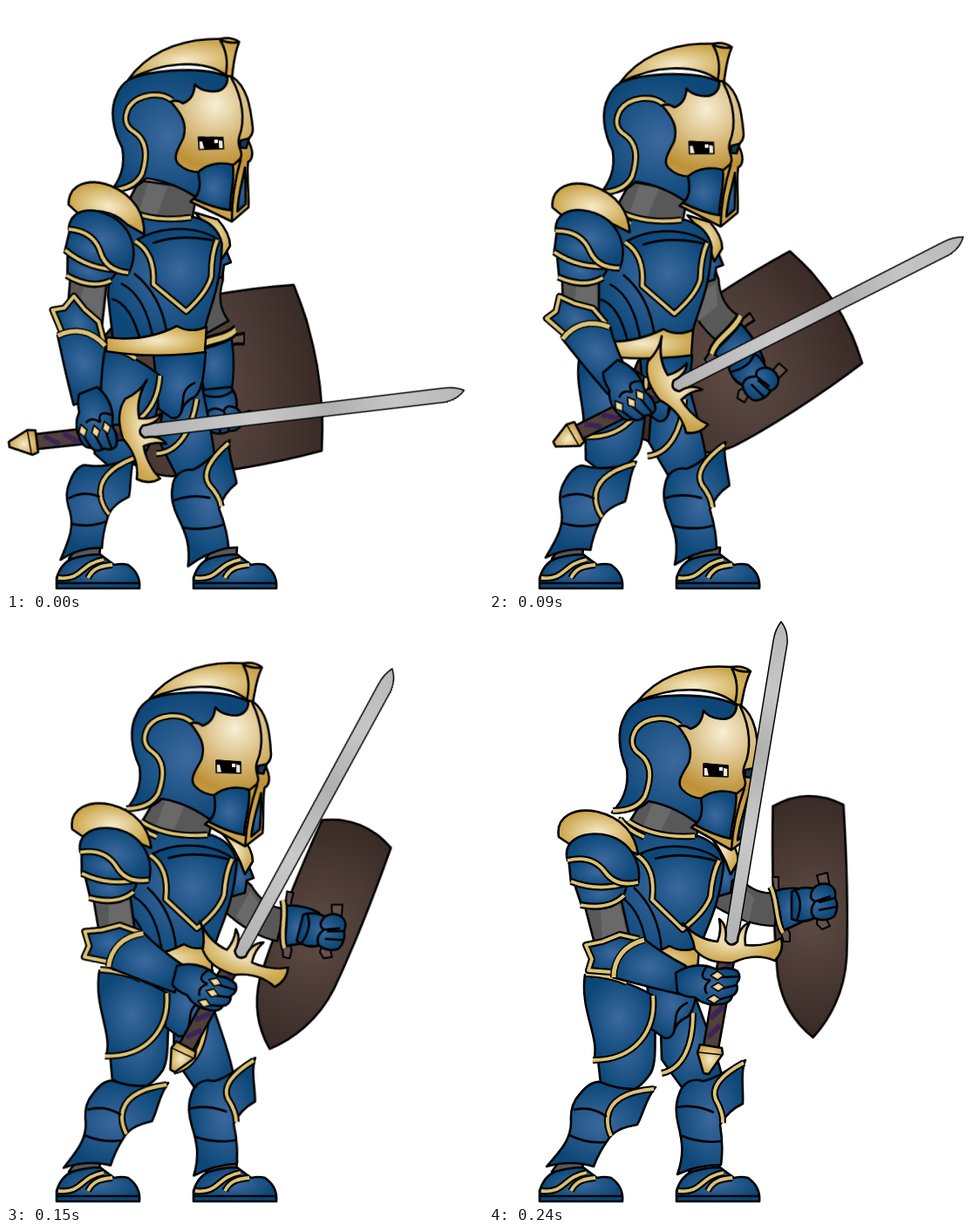
An HTML page that plays this animation: 547x671 px, repeating every 0.39 s.

```html
<!DOCTYPE html>
<html lang="en">
<head>
<meta charset="utf-8">
<title>Knight raising his guard</title>
<style>
html, body { margin: 0; width: 100%; height: 100%; overflow: hidden; background: #fff; }
svg { display: block; width: 547px; height: 671px; }
path { stroke: #000; stroke-width: 2.6; stroke-linejoin: round; }
.blue { fill: url(#blue); }
.gold { fill: url(#gold); }
.gray { fill: #585858; }
.brown { fill: #65524b; stroke-width: 2; }
.line { fill: none; }
.edge { fill: none; stroke-width: 8; }
.trim { fill: none; stroke: #dcc275; stroke-width: 3.8; }
.flat { stroke: none; }
.sheen { stroke: none; fill: #696969; }

/* Poses --a to --f; steps() gives the 30 ms frame rate. */
.part { animation: guard 390ms infinite; }
@keyframes guard {
  0% { transform: var(--a); animation-timing-function: steps(2); }
  15.38% { transform: var(--b); animation-timing-function: steps(2); }
  30.76% { transform: var(--c); animation-timing-function: step-end; }
  38.46% { transform: var(--d); animation-timing-function: step-end; }
  46.15% { transform: var(--e); animation-timing-function: steps(2); }
  61.53%, 100% { transform: var(--f, translate(0px, 0px) rotate(0deg)); animation-timing-function: step-end; }
}
#shield {
  transform-origin: 0 0;
  --a: translate(346px, 415px) rotate(80.4deg) scale(1.93, 1);
  --b: translate(367.5px, 387.5px) rotate(71.2deg) scale(1.76, 1);
  --c: translate(405.5px, 303.5px) rotate(43.1deg) scale(1.3, 1);
  --d: translate(402px, 246.5px) rotate(22deg) scale(.85, 1);
  --e: translate(372px, 219px) rotate(3.2deg) scale(.86, 1);
  --f: translate(366px, 214px) rotate(-1.2deg) scale(.81, 1);
}
#farUpper {
  transform-origin: 272px 300px;
  --a: translate(-34px, 5px) rotate(59deg);
  --b: translate(-29px, 8px) rotate(53deg);
  --c: translate(-15px, 8px) rotate(25deg);
  --d: translate(-5px, 7px) rotate(12deg);
  --e: translate(-1px, 4px) rotate(1deg);
}
#farShoulder {
  transform-origin: 268px 275px;
  --a: translate(-29px, -3px) rotate(0deg);
  --b: translate(-24px, 0px) rotate(0deg);
  --c: translate(-13px, 0px) rotate(0deg);
  --d: translate(-3px, 0px) rotate(0deg);
  --e: translate(-1px, 0px) rotate(0deg);
}
#farForearm {
  transform-origin: 328px 335px;
  --a: translate(-90px, 45px) rotate(91deg) scale(1.75, .9);
  --b: translate(-76px, 45px) rotate(80deg) scale(1.6, .95);
  --c: translate(-42px, 36px) rotate(37deg) scale(1.26, 1);
  --d: translate(-12px, 16px) rotate(14deg) scale(1.07, 1);
  --e: translate(-3px, 0px) rotate(5deg) scale(1.05, 1);
  --f: translate(0px, 0px) rotate(0deg) scale(1, 1);
}
#farHand {
  transform-origin: 377px 325px;
  --a: translate(-128px, 143px) rotate(84deg);
  --b: translate(-107px, 130px) rotate(74deg);
  --c: translate(-32px, 76px) rotate(37deg);
  --d: translate(-10px, 33px) rotate(14deg);
  --e: translate(-1px, 7px) rotate(3deg);
}
#farShin {
  transform-origin: 243px 632px;
  --a: translate(-9px, 0px) rotate(-12.5deg);
  --b: translate(-6px, 0px) rotate(-10.5deg);
  --c: translate(-2px, 0px) rotate(-6deg);
  --d: translate(-1px, 0px) rotate(-3.2deg);
  --e: translate(0px, 0px) rotate(-1.3deg);
}
#nearShin {
  transform-origin: 95px 628px;
  --a: translate(-7px, 0px) rotate(-16deg) scale(.92, 1);
  --b: translate(-4px, 0px) rotate(-13deg) scale(.96, 1);
  --c: translate(-1px, 0px) rotate(-6.5deg) scale(.98, 1);
  --d: translate(0px, 0px) rotate(-3deg) scale(1, 1);
  --e: translate(0px, 0px) rotate(-1deg) scale(1, 1);
  --f: translate(0px, 0px) rotate(0deg) scale(1, 1);
}
.thigh {
  transform-origin: 180px 410px;
  --a: translate(-8px, -9px) rotate(9deg);
  --b: translate(-6px, -8px) rotate(7.5deg);
  --c: translate(-5px, -4px) rotate(3.5deg);
  --d: translate(-3px, -3px) rotate(1.5deg);
  --e: translate(-1px, -1px) rotate(.5deg);
}
.hips {
  transform-origin: 190px 405px;
  --a: translate(-11px, -8px) rotate(0deg);
  --b: translate(-9px, -6px) rotate(0deg);
  --c: translate(-5px, -3px) rotate(0deg);
  --d: translate(-3px, -2px) rotate(0deg);
  --e: translate(-1px, -1px) rotate(0deg);
}
#torso {
  transform-origin: 215px 310px;
  --a: translate(-19px, -5px) rotate(-4.5deg);
  --b: translate(-16px, -3px) rotate(-4deg);
  --c: translate(-8px, -2px) rotate(-2.2deg);
  --d: translate(-4px, -1px) rotate(-1deg);
  --e: translate(-1px, 0px) rotate(-.2deg);
}
#head {
  transform-origin: 225px 164px;
  --a: translate(-25.5px, -14px) rotate(-3.8deg);
  --b: translate(-22px, -12px) rotate(-3.3deg);
  --c: translate(-11.5px, -7px) rotate(-1.8deg);
  --d: translate(-5px, -3.5px) rotate(-.8deg);
  --e: translate(-1.3px, -.7px) rotate(-.2deg);
}
#pauldron {
  transform-origin: 125px 245px;
  --a: translate(-8px, -15px) rotate(9deg);
  --b: translate(-8px, -15px) rotate(8deg);
  --c: translate(-6px, -14px) rotate(3deg);
  --d: translate(-4px, -8px) rotate(1deg);
  --e: translate(-1px, -1px) rotate(.3deg);
}
#upperArm {
  transform-origin: 130px 276px;
  --a: translate(-20px, -8px) rotate(19deg);
  --b: translate(-18px, -9px) rotate(17deg);
  --c: translate(-11px, -11px) rotate(9deg);
  --d: translate(-5px, -6px) rotate(5deg);
  --e: translate(-1.5px, -1px) rotate(2deg);
}
#forearm {
  transform-origin: 158px 390px;
  --a: translate(-73px, -8px) rotate(63deg);
  --b: translate(-62px, -14px) rotate(56deg);
  --c: translate(-36px, -18px) rotate(17deg);
  --d: translate(-23px, -10px) rotate(7deg);
  --e: translate(-7px, -4px) rotate(2.5deg);
}
#sword {
  transform-origin: 263px 422px;
  --a: translate(-160px, 66.5px) rotate(73.8deg);
  --b: translate(-137px, 54px) rotate(66.2deg);
  --c: translate(-62px, 12px) rotate(41.2deg);
  --d: translate(-26px, 7px) rotate(19.2deg);
  --e: translate(-6px, 1px) rotate(4.6deg);
}
</style>
</head>
<body>
<svg viewBox="0 0 547 671">
  <defs>
    <radialGradient id="blue"><stop stop-color="#3c699e"/><stop offset="1" stop-color="#0d4778"/></radialGradient>
    <radialGradient id="gold"><stop stop-color="#f6ebca"/><stop offset="1" stop-color="#cba54b"/></radialGradient>
    <radialGradient id="mask" gradientUnits="userSpaceOnUse" cx="268" cy="130" r="88">
      <stop stop-color="#f8efd6"/><stop offset=".8" stop-color="#bd9136"/><stop offset="1" stop-color="#c9a24a"/>
    </radialGradient>
    <radialGradient id="wood" gradientUnits="userSpaceOnUse" cx="0" cy="125" r="150">
      <stop stop-color="#5f4c45"/><stop offset="1" stop-color="#352723"/>
    </radialGradient>
    <linearGradient id="steel" gradientUnits="userSpaceOnUse" x1="330" y1="10" x2="277" y2="370">
      <stop stop-color="#b9b9b9"/><stop offset=".2" stop-color="#c6c6c6"/><stop offset=".4" stop-color="#b0b0b0"/>
      <stop offset=".65" stop-color="#c9c9c9"/><stop offset="1" stop-color="#b2b2b2"/>
    </linearGradient>
    <path id="stud" class="gold" d="M-8 0L0-5 7 0 0 5Z" style="stroke-width:1.5"/>
    <g id="foot">
      <path class="gray" d="M72 634L80 623 108 621 107 634Z"/>
      <path class="blue" d="M58 668V656C62 643 68 637 76 634Q92 629 108 629L124 641Q133 639 140 641C150 648 154 658 153 668Z"/>
      <path class="trim" d="M60 656C88 659 84 640 112 635"/>
      <path class="trim" d="M94 656C100 644 110 642 122 641"/>
      <path class="line" d="M58 662H153"/>
    </g>
  </defs>

  <g class="part" id="shield">
    <path fill="url(#wood)" vector-effect="non-scaling-stroke" d="M-50 0Q0-22 50 0C53 60 53 130 50 175C46 215 24 246 0 266C-24 250-42 228-48 195C-53 140-53 60-50 0Z"/>
  </g>

  <g class="part" id="farUpper">
    <path class="gray" d="M258 280L286 296Q305 317 329 314L328 352Q296 352 260 330Z"/>
    <path class="sheen" d="M286 302L304 320 298 348 276 334Z"/>
  </g>
  <g class="part" id="farForearm">
    <path class="brown" d="M325 296H332V306L340 352 345 360V370H338L330 345Z"/>
    <path class="blue" d="M328 312Q346 306 364 311L364 345Q350 352 336 358Q334 332 328 312Z"/>
    <path class="trim" d="M323 307C331 322 328 345 337 360"/>
  </g>
  <g class="part" id="farHand">
    <path class="brown" d="M376 294L388 291 390 303 387 345 391 352 382 356 376 350 379 305Z"/>
    <path class="blue" d="M347 313Q358 306 372 309Q380 301 391 305Q399 310 397 320Q402 330 396 341Q386 348 373 343Q360 350 347 344Z"/>
    <path class="line" d="M372 309Q365 320 374 324L392 318M397 320L378 325M374 324Q366 335 373 343M378 334L399 330M352 312Q361 326 353 345"/>
  </g>

  <use href="#foot" x="157"/>
  <use href="#foot"/>

  <g class="part thigh">
    <path class="blue" d="M196 430L236 432C250 470 262 500 268 528L226 544Q212 525 198 505Z"/>
    <path class="trim" d="M234 452C234 490 222 516 198 521"/>
  </g>
  <g class="part" id="farShin">
    <path class="blue" d="M218 545C222 532 232 526 245 530C260 528 275 515 294 506C288 520 292 540 291 556Q274 564 265 580Q269 605 266 626Q240 626 216 637C224 615 222 600 217 580Q212 560 218 545Z"/>
    <path class="trim" d="M292 509C268 522 254 536 260 551Q269 567 268 578"/>
    <path class="line" d="M216 560Q236 556 258 566M219 592Q242 602 266 599"/>
  </g>
  <g class="part thigh">
    <path class="blue" d="M118 430H195C186 470 195 500 186 520Q172 542 150 546L128 532Q124 500 118 430Z"/>
  </g>
  <g class="part" id="nearShin">
    <path class="blue" d="M104 545C112 535 122 528 130 532Q155 543 191 537C180 550 178 565 170 580Q144 584 136 598Q126 612 120 628Q94 620 66 628C84 608 95 595 94 575Q93 557 104 545Z"/>
    <path class="trim" d="M189 539C155 542 138 553 136 572Q135 582 140 593"/>
    <path class="line" d="M97 563Q118 558 135 571M92 592Q112 602 134 600"/>
  </g>

  <g class="part hips">
    <path class="blue" d="M180 405H240C238 432 236 448 228 456Q214 462 212 474Q208 483 200 480L186 470Z"/>
    <path class="line" d="M228 440Q214 446 214 460L212 474"/>
  </g>
  <g class="part thigh">
    <path class="blue" d="M110 408Q155 412 188 432C191 472 170 505 120 507C128 480 104 450 110 408Z"/>
    <path class="trim" d="M188 432C192 472 168 506 119 506"/>
    <path class="trim" d="M111 407Q140 408 158 417"/>
  </g>

  <g class="part" id="farShoulder">
    <path class="blue" d="M256 270L281 282 287 297 279 300 277 314 256 320Z"/>
    <path class="gold" d="M246 240L272 248Q286 264 286 278L277 293Q268 264 246 240Z"/>
  </g>
  <g class="part" id="torso">
    <path class="gray" d="M180 202L246 216 238 248H195L161 233Z"/>
    <path class="sheen" d="M190 206L212 212 196 246 176 240Z"/>
    <path class="blue" d="M150 228C180 250 210 254 240 249Q266 258 269 282C264 335 246 358 240 384L192 392L136 388L134 330Z"/>
    <path class="line" d="M138 335Q160 342 168 390M150 318Q178 335 182 388M166 308Q195 335 198 380"/>
    <path class="blue" d="M172 270C200 256 240 258 264 276C258 290 258 305 254 318Q245 338 222 356L187 322Q189 290 172 270Z"/>
    <path class="line" d="M190 275Q222 266 262 278"/>
    <path class="trim" d="M170 271C186 282 190 300 187 322L222 356Q248 336 254 318Q256 292 264 277"/>
    <path class="trim" d="M160 232Q190 252 236 249"/>
    <path class="trim" d="M150 229Q158 242 178 250"/>
  </g>
  <g class="part hips">
    <path class="gold" d="M126 388Q170 394 207 375Q222 384 241 376L239 405Q180 413 126 404Z"/>
  </g>

  <g class="part" id="head">
    <path class="blue" d="M141 222C152 210 161 195 158 172C149 152 146 128 156 111Q160 101 172 94C205 84 260 86 284 99V130L242 237Q215 215 183 209C172 220 155 223 141 222Z"/>
    <path class="gold" d="M170 95C190 70 225 51 278 55Q292 53 300 60C293 74 292 85 289 100L282 97C262 79 215 74 170 95Z"/>
    <path class="line" d="M278 56Q288 74 282 97M278 56Q290 62 300 60"/>
    <path class="trim" d="M219 122C206 110 180 112 169 126C161 139 164 149 173 155C190 168 184 190 179 203C172 216 156 220 142 220"/>
    <path fill="url(#mask)" d="M284 98C284 110 276 117 262 114Q251 112 246 105Q244 122 231 126Q225 121 217 123C230 140 234 150 229 165C224 175 214 186 221 195Q230 205 245 206Q250 226 232 239L278 265L298 250C300 235 298 215 301 198C308 195 308 184 302 172Q309 168 309 160C308 135 306 112 289 99Z"/>
    <path class="line" d="M288 100C300 125 301 150 293 168C288 180 298 186 292 194L283 201M293 194Q280 230 278 264"/>
    <path class="blue" d="M243 206C255 196 272 196 283 200C286 215 277 235 277 252Q258 248 236 236Q247 228 243 206Z"/>
    <path class="blue" d="M297 204C293 220 287 235 285 254L295 246Q297 225 297 204Z"/>
    <path d="M246 166L274 168 274 181 246 180Z" fill="#f0e8dc" style="stroke-width:1.6"/>
    <path class="flat" d="M246 165L274 168V172L269 171V180H252L250 171 246 171Z"/>
    <path class="flat" d="M264 170h4v4h-4z" fill="#fff"/>
    <path d="M294 173L304 171 300 182 293 181Z" fill="#123a5c"/>
  </g>

  <g class="part" id="pauldron">
    <path class="gold" d="M80 250C76 226 98 216 124 221C154 228 168 248 171 270L150 262Q125 244 92 258Z"/>
  </g>
  <g class="part" id="upperArm">
    <path class="gray" d="M108 322L150 315 162 368 122 376Z"/>
    <path class="sheen" d="M128 332L150 328 158 362 130 368Z"/>
    <path class="blue" d="M96 298Q125 312 158 304Q156 322 140 330Q120 336 106 328Z"/>
    <path class="trim" d="M105 328Q138 334 155 317"/>
    <path class="blue" d="M91 272L94 302Q125 312 158 304L140 280Z"/>
    <path class="trim" d="M94 301Q125 313 158 303"/>
    <path class="blue" d="M90 277C84 255 105 244 130 247C162 252 176 280 171 304Q146 308 134 291Q120 270 90 277Z"/>
    <path class="trim" d="M90 277Q118 270 133 290Q146 308 171 302"/>
  </g>
  <g class="part" id="forearm">
    <path class="blue" d="M111 374L130 370 150 361 172 367 160 388 140 406 114 403 118 390Z"/>
    <path class="trim" d="M172 367L150 362 130 370 111 374 118 390 114 403 140 405"/>
    <path class="blue" d="M142 411C142 390 155 372 178 367Q196 382 226 398L222 431Q190 424 142 411Z"/>
    <path class="trim" d="M143 411C143 390 155 374 178 368" style="stroke-width:5"/>
  </g>

  <g class="part" id="sword">
    <path d="M263 390L281 392 263 493 246 490Z" fill="#52403a"/>
    <path d="M262 408L277 396M258 434L273 418M254 458L269 444M251 480L265 466" class="line" style="stroke:#3a2556;stroke-width:6"/>
    <path class="gold" d="M242 488L267 492 268 499 252 522 246 521 239 497Z"/>
    <path class="line" d="M240 497L268 500" style="stroke-width:1.5"/>
    <path fill="url(#steel)" style="stroke-width:1.5" d="M270 368L326 25Q328 12 335 3Q343 13 342 28L285 370Q277 378 270 368Z"/>
    <path class="gold" d="M222 349Q240 368 262 370Q267 358 264 344Q274 352 271 368Q277 378 285 370Q286 353 299 348Q292 360 294 374Q318 376 335 366Q339 380 328 392Q305 382 280 394Q250 396 236 379Q233 360 222 349Z"/>
    <path class="blue" d="M214 406Q230 395 250 398L262 402Q274 398 285 404Q290 411 284 418Q287 428 279 432Q277 442 262 442Q248 444 236 434Q222 433 216 428Z"/>
    <path class="line" d="M250 398Q238 414 254 414M264 411L286 410M266 424L284 420M262 437L280 432M254 414Q244 422 250 430"/>
    <use href="#stud" x="262" y="409"/>
    <use href="#stud" x="263" y="422"/>
    <use href="#stud" x="258" y="436"/>
  </g>
</svg>
<script>
// Give every gold trim a black border.
for (const trim of document.querySelectorAll('.trim')) {
  const edge = trim.cloneNode();
  edge.removeAttribute('style');
  edge.setAttribute('class', 'edge');
  trim.before(edge);
}
</script>
</body>
</html>
```
